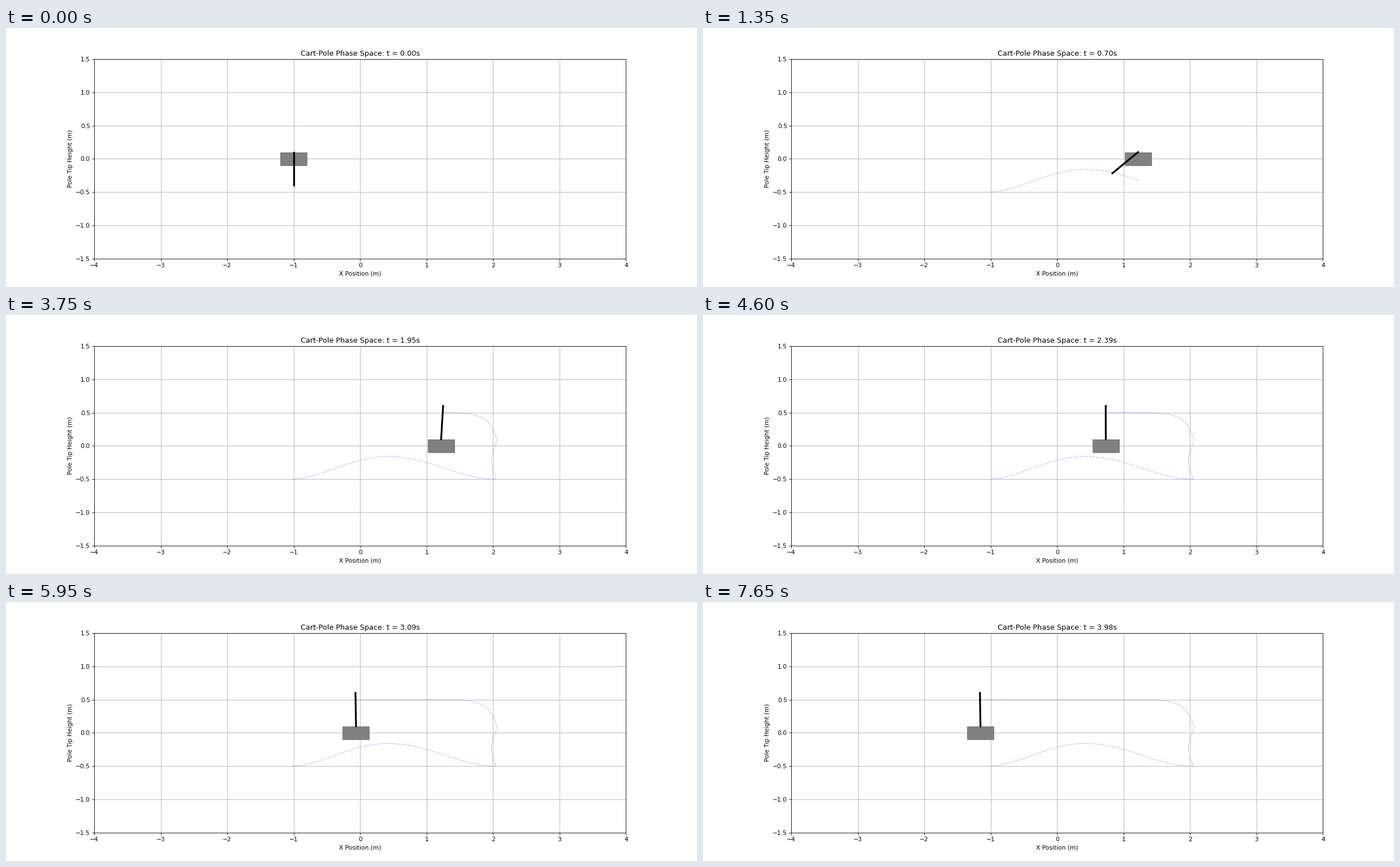
Recreate the animation shown at these times as a matplotlib script. Size 1222 px wide and 458 px high, loop 7.7 s.

```python
import numpy as np
import matplotlib.pyplot as plt
from matplotlib.animation import FuncAnimation
from matplotlib.patches import Rectangle

FRAMES, INTERVAL = 154, 50
DT = 0.026                      # simulated seconds per frame
POLE, CART_W, CART_H = 0.5, 0.4, 0.2


def launch(n, lag):
    """Frame count that starts at rest and soon trails by `lag`."""
    return n - lag * (1 - np.exp(-n / lag))


def ease(n, n0, n1, a, b):
    u = (n - n0) / (n1 - n0)
    return a + (b - a) * (1 - np.cos(np.pi * u)) / 2


def cart_x(n):
    if n < 37:                  # fast glide to the right
        return -1 + 0.0866 * launch(n, 1.4)
    if n < 41:                  # sudden stop, back and forth
        return ease(n, 37, 41, 2.045, 1.972)
    if n < 44:
        return ease(n, 41, 44, 1.972, 2.06)
    if n < 50:
        return 2.06 - 0.0218 * (n - 44)
    s = n - 50                  # drift to the left, slowly gaining speed
    return 1.929 - 0.0284 * s - 0.157 * (s / 103) ** 4


def pole_angle(n):
    """Degrees from hanging down, positive to the right."""
    if n < 17.8:
        return -71.2 * np.sin(np.pi / 2 * launch(n, 0.7) / 17.1)
    if n < 36.5:
        return -71.2 * np.cos(np.pi / 2 * (n - 17.8) / 18.5)
    settle = 181 - 46 * np.exp(-3.6 * DT * (n - 50))
    return min(14.2 * (n - 36.5), settle)


x = np.array([cart_x(n) for n in range(FRAMES)])
theta = np.radians([pole_angle(n) for n in range(FRAMES)])
height = -POLE * np.cos(theta)

fig, ax = plt.subplots(figsize=(16, 5.9968), dpi=76.375)    # 1222 x 458 px
ax.set_xlim(-4, 4)
ax.set_ylim(-1.5, 1.5)
ax.set_aspect("equal")
ax.set_xlabel("X Position (m)")
ax.set_ylabel("Pole Tip Height (m)")
ax.grid(True)

trail, = ax.plot([], [], "b--", lw=1, alpha=0.3)
cart = ax.add_patch(Rectangle((0, 0), CART_W, CART_H, color="gray", zorder=3))
pole, = ax.plot([], [], "k-", lw=3, zorder=4)
title = ax.set_title("")


def update(i):
    top = CART_H / 2
    cart.set_xy((x[i] - CART_W / 2, -top))
    pole.set_data([x[i], x[i] + POLE * np.sin(theta[i])], [top, top + height[i]])
    trail.set_data(x[:i + 1], height[:i + 1])
    title.set_text(f"Cart-Pole Phase Space: t = {i * DT:.2f}s")
    return trail, cart, pole, title


anim = FuncAnimation(fig, update, frames=FRAMES, interval=INTERVAL,
                     init_func=lambda: update(0), repeat=True, repeat_delay=0)
plt.show()
```
